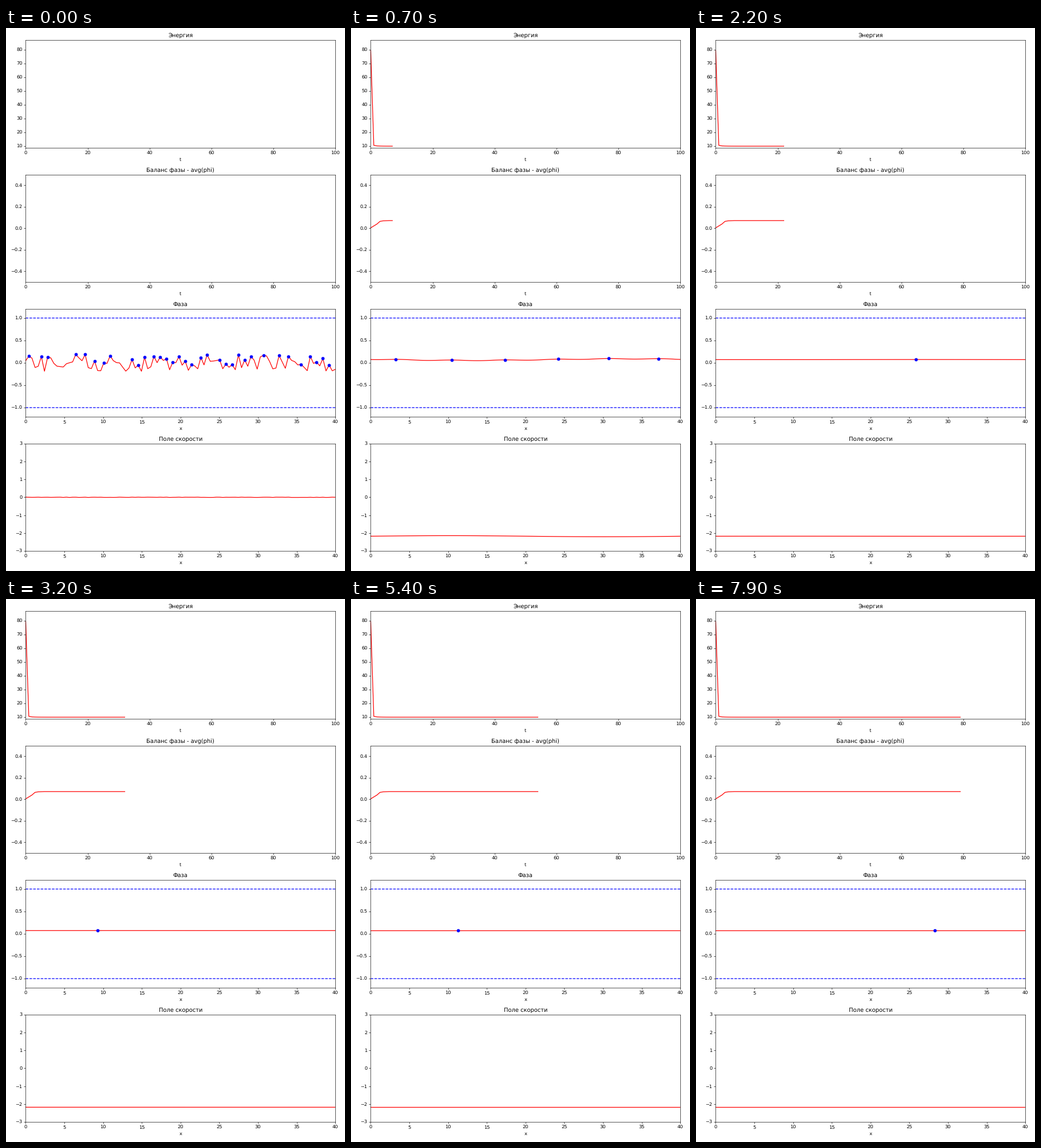
A matplotlib script for the animation above (8000 ms loop, 592 px wide and 947 px high).

```python
import numpy as np
import matplotlib.pyplot as plt
from matplotlib.animation import FuncAnimation

W, H, DPI = 592, 947, 64
FRAMES, STEP = 80, 100
N, K = 100, 0.925          # grid nodes, style scale
PERIOD = 2 * np.pi / N
DRIFT = -54.33             # nodes travelled per step
V_END = -2.173

plt.rcParams.update({
    "font.family": "DejaVu Sans",
    "font.size": 10 * K,
    "text.hinting": "none",
    "axes.linewidth": 0.8 * K,
    "axes.titlepad": 6 * K,
    "axes.labelpad": 4 * K,
    "lines.linewidth": 1.5 * K,
    "lines.markersize": 6 * K,
    "lines.markeredgewidth": 1.0 * K,
})
for side in ("xtick", "ytick"):
    plt.rcParams[f"{side}.major.size"] = 3.5 * K
    plt.rcParams[f"{side}.major.width"] = 0.8 * K
    plt.rcParams[f"{side}.major.pad"] = 3.5 * K

rng = np.random.default_rng(7)
noise = rng.uniform(-0.19, 0.19, N)
jitter = rng.uniform(-0.008, 0.008, N)

node = np.arange(N)
x = np.linspace(0, 40, N)
time = np.arange(FRAMES)
energy = 10.08 + 68.6 * np.exp(-6 * time) + 0.9 * np.exp(-0.75 * time)
balance = np.interp(time, [0, 2, 3, 4, 6], [0.005, 0.04, 0.065, 0.07, 0.0725])


def wave(k, centre):
    return np.cos(k * PERIOD * (node - centre))


def phase(t):
    """Noise that decays into a few harmonics carried by the flow."""
    if t == 0:
        return noise
    c = (46.97 + DRIFT * (t - 15)) % N
    return (balance[t]
            + 0.018 * np.exp(-0.18 * (t - 7)) * wave(1, c)
            + 0.007 * np.exp(-0.35 * (t - 7)) * wave(6, c + 11.03)
            + 0.3 * np.exp(-1.1 * t) * wave(3, c + 20))


def velocity(t):
    if t == 0:
        return jitter
    return (V_END * (1 - np.exp(-1.1 * t))
            + 0.03 * np.exp(-0.18 * (t - 7)) * wave(1, 25)
            + 6 * np.exp(-1.4 * t) * wave(2, 80))


def peaks(y):
    inner = y[1:-1]
    return np.flatnonzero((inner > y[:-2]) & (inner > y[2:])) + 1


fig = plt.figure(figsize=(W / DPI, H / DPI), dpi=DPI, facecolor="white")


def panel(row, title, xlabel, xmax, ylim):
    top = 21.2 + 234.5 * row
    ax = fig.add_axes([34.4 / W, 1 - (top + 187.5) / H, 540.8 / W, 187.5 / H])
    ax.set(title=title, xlabel=xlabel, xlim=(0, xmax), ylim=ylim)
    return ax


ax_e = panel(0, "Энергия", "t", 100, (9, 87))
ax_b = panel(1, "Баланс фазы - avg(phi)", "t", 100, (-0.5, 0.5))
ax_p = panel(2, "Фаза", "x", 40, (-1.2, 1.2))
ax_v = panel(3, "Поле скорости", "x", 40, (-3, 3))

line_e, = ax_e.plot([], [], "r")
line_b, = ax_b.plot([], [], "r")
for level in (1, -1):
    ax_p.plot([0, 40], [level, level], "b--", snap=False)
line_p, = ax_p.plot([], [], "r")
dots, = ax_p.plot([], [], "bo")
line_v, = ax_v.plot([], [], "r")


def update(t):
    n = t + 1 if t else 0
    line_e.set_data(time[:n], energy[:n])
    line_b.set_data(time[:n], balance[:n])
    y = phase(t)
    top = peaks(y)
    line_p.set_data(x, y)
    dots.set_data(x[top], y[top])
    line_v.set_data(x, velocity(t))
    return line_e, line_b, line_p, dots, line_v


anim = FuncAnimation(fig, update, frames=FRAMES, interval=STEP, repeat=True)
plt.show()
```
